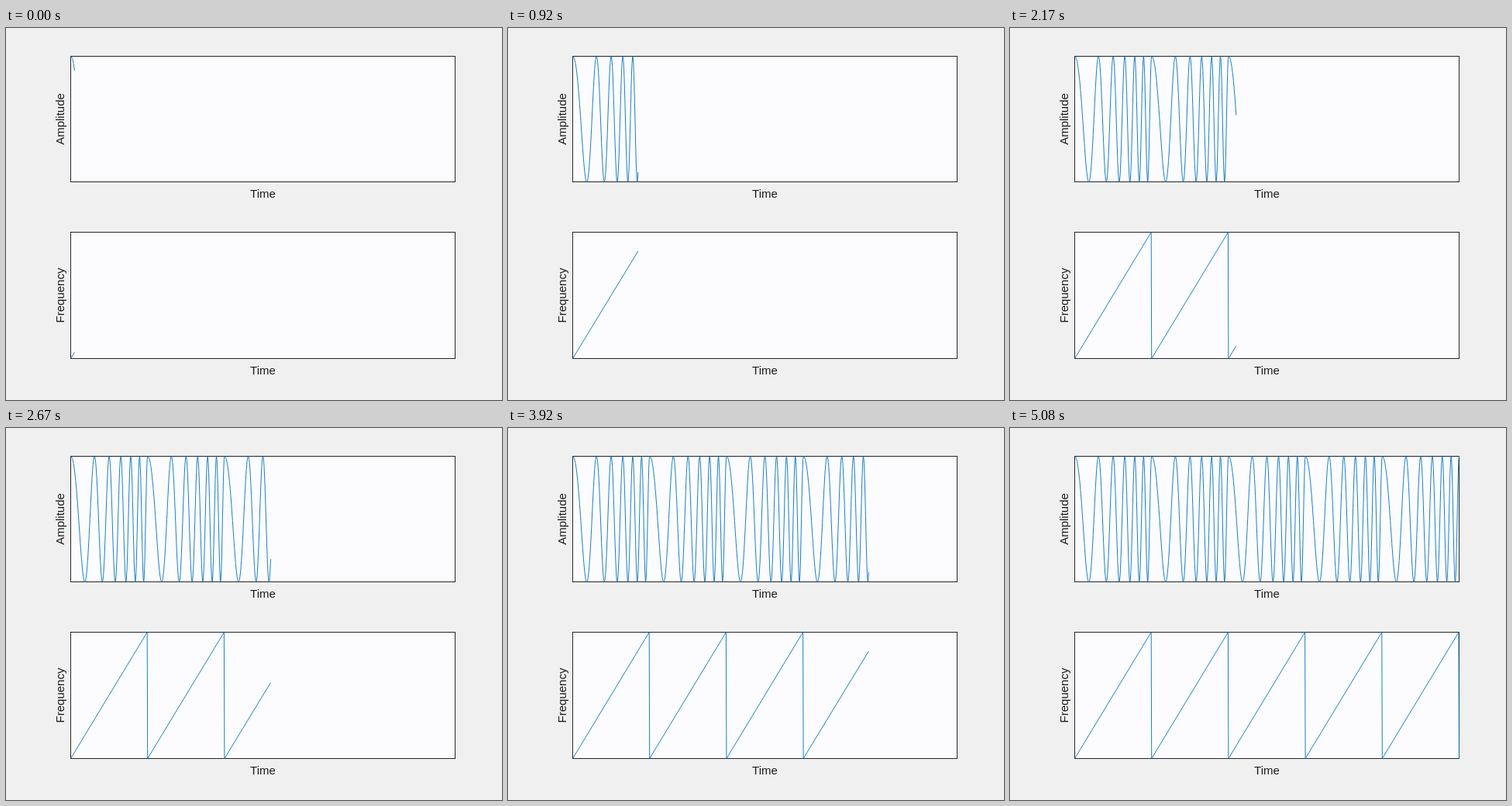
Animation of 640x480 px, one loop 5160 ms. Source, as an HTML page:

```html
<!DOCTYPE html>
<html lang="en">
<head>
<meta charset="utf-8">
<title>Sawtooth chirp</title>
<style>
  html, body { margin: 0; width: 100%; height: 100%; overflow: hidden; background: #f0f0f0; }
  svg { display: block; width: 640px; height: 480px; }
  rect { fill: #fcfcfe; stroke: #262626; }
  path { fill: none; stroke: #0072bd; stroke-width: .9; stroke-linejoin: round; }
  text { font: 15px "Liberation Sans", Arial, sans-serif; fill: #1c1c1c; text-anchor: middle; }
</style>
</head>
<body>
<svg viewBox="0 0 640 480">
  <rect x="83.5" y="36.5" width="496" height="162"/>
  <rect x="83.5" y="263.5" width="496" height="163"/>
  <text x="331.5" y="219">Time</text>
  <text x="331.5" y="447">Time</text>
  <text transform="translate(75 117.5) rotate(-90)">Amplitude</text>
  <text transform="translate(75 345) rotate(-90)">Frequency</text>
  <path id="wave"/>
  <path id="ramp"/>
</svg>
<script>
  const LOOP = 5160, FPS = 12;
  const LEFT = 83.5, PERIOD = 99.2;
  const WAVE_TOP = 36.5, WAVE_HEIGHT = 162;
  const RAMP_BASE = 426.5, RAMP_HEIGHT = 163;
  const STEPS = 20;   // growth steps per sweep
  const FINE = 10;    // curve points per step
  const wave = document.getElementById('wave');
  const ramp = document.getElementById('ramp');

  const point = (s, y) => (LEFT + s * PERIOD).toFixed(2) + ' ' + y.toFixed(2);

  // Frequency rises linearly through each sweep, six cycles in all.
  const chirp = u => Math.cos(2 * Math.PI * (2 * u + 4 * u * u));

  function wavePath(steps) {
    const pts = [];
    for (let i = 0; i <= steps * FINE; i++) {
      const s = i / (STEPS * FINE);
      pts.push(point(s, WAVE_TOP + WAVE_HEIGHT * (1 - chirp(s % 1)) / 2));
    }
    return 'M' + pts.join('L');
  }

  function rampPath(steps) {
    const at = (s, level) => point(s, RAMP_BASE - RAMP_HEIGHT * level);
    const pts = [at(0, 0)];
    const end = steps / STEPS, full = Math.floor(end);
    for (let n = 1; n <= full; n++) pts.push(at(n - 0.005, 1), at(n, 0));
    if (end > full) pts.push(at(end, end - full));
    return 'M' + pts.join('L');
  }

  let shown = -1;
  function draw(now) {
    const t = Math.floor((now % LOOP) / 10) * 10;
    const tick = Math.floor((t + 5) * FPS / 1000);
    const steps = Math.min(100, Math.max(tick + 1, Math.floor(tick * 5 / 3) - 1));
    if (steps !== shown) {
      shown = steps;
      wave.setAttribute('d', wavePath(steps));
      ramp.setAttribute('d', rampPath(steps));
    }
  }

  const start = performance.now();
  function loop() {
    draw(performance.now() - start);
    requestAnimationFrame(loop);
  }
  loop();
</script>
</body>
</html>
```
